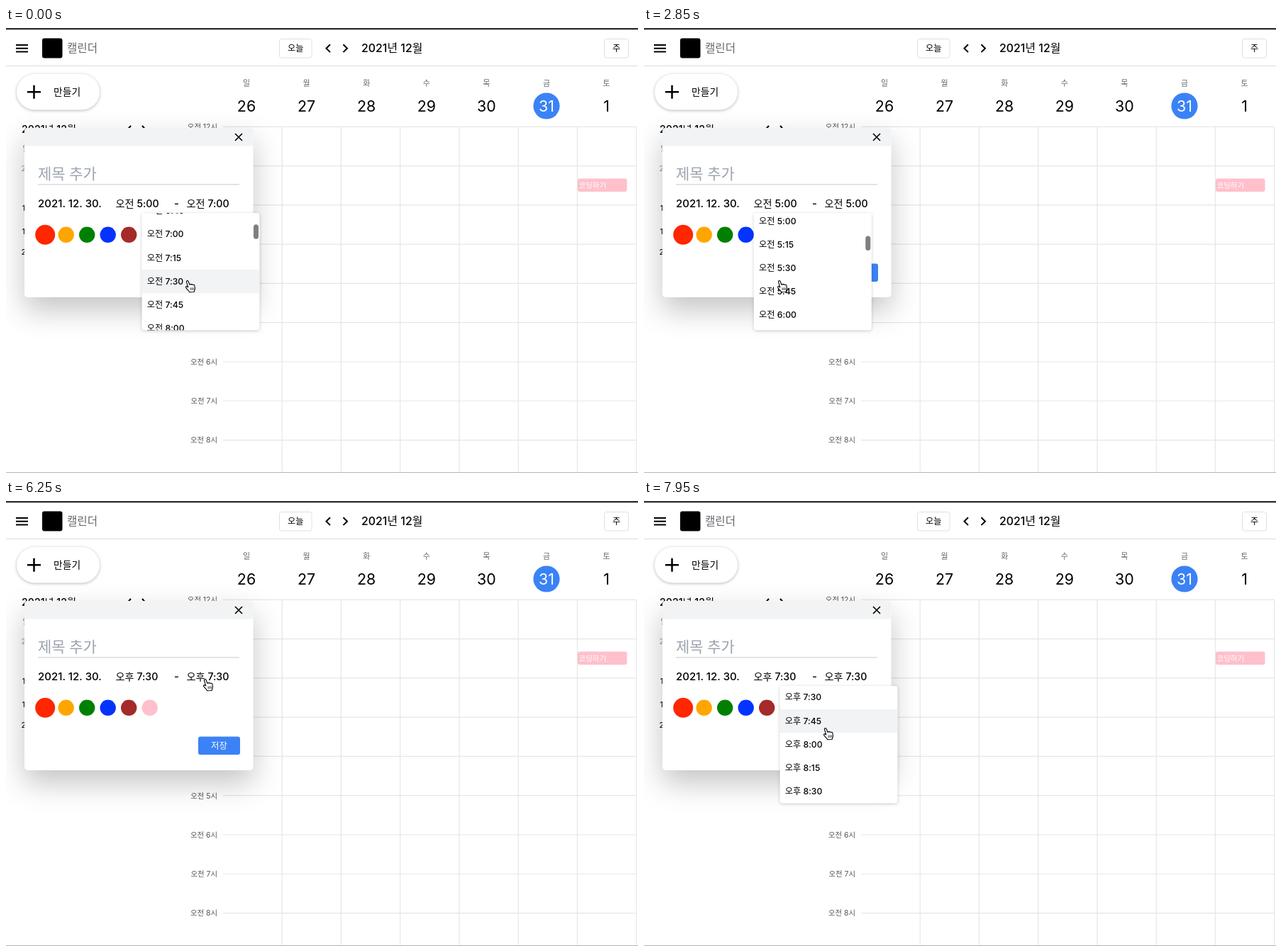
An HTML page that plays this animation: 891x628 px, repeating every 8000 ms.

```html
<!DOCTYPE html>
<html lang="ko">
<head>
<meta charset="utf-8">
<style>
  html, body { margin: 0; width: 100%; height: 100%; overflow: hidden; background: #fff; }
  svg { display: block; width: 891px; height: 628px; }
  text { font-family: Inter, "Noto Sans CJK KR", "Noto Sans CJK", sans-serif; white-space: pre; }
  .ln { fill: none; stroke: #000; stroke-width: 2; }
  .grid { stroke: #e6e6e6; stroke-width: 1.2; }
  .modal { filter: drop-shadow(0 18px 20px rgba(0,0,0,.23)); }
  .pill { filter: drop-shadow(0 1px 2px rgba(0,0,0,.28)); }
  .menu { filter: drop-shadow(0 1px 2px rgba(0,0,0,.2)); }
</style>
</head>
<body>
<svg id="stage" viewBox="0 0 891 628">
  <clipPath id="menuClip"><rect y="261" width="166" height="165.5" rx="4"/></clipPath>
  <g id="page">
    <g id="back"></g>
    <g id="dialog"></g>
    <g id="menu">
      <rect class="menu" y="261" width="166" height="165.5" rx="4" fill="#fff"/>
      <g clip-path="url(#menuClip)">
        <rect id="hover" width="166" height="33.2" fill="#f1f3f4"/>
        <g id="rows"></g>
      </g>
      <rect id="thumb" x="157.5" width="7" height="20.5" rx="3.5" fill="#7f7f7f"/>
    </g>
  </g>
  <rect width="891" height="2.4" fill="#35343b"/>
  <rect y="627" width="891" height="1" fill="#b4b4b6"/>
  <g id="cursor">
    <path id="arrow" d="M0 0V13.5L3.1 10.6 5.2 15.6 7.4 14.7 5.3 9.8H9.4Z" fill="#000" stroke="#fff" stroke-width=".9"/>
    <g id="hand" stroke="#000" stroke-linejoin="round">
      <path d="M-3.6 1.8C-3.3.2-1.2.2-.8 1.7L.8 6.3C1.1 5.2 2.9 5.2 3.2 6.3 3.7 5.3 5.3 5.5 5.6 6.7 6.2 5.9 7.7 6.3 7.9 7.5L8.4 11C8.6 13.2 7.4 14.4 7.1 16.5L.8 16.8C0 14.9-2.6 13-4.2 10.6-5 9.2-3.6 8.2-2.4 9L-1.3 9.9Z" fill="#fff" stroke-width="1.1"/>
      <path d="M2 10.5L2.4 14M4.1 10.4L4.5 13.9M6.1 10.3L6.4 13.6" fill="none" stroke-width=".8"/>
    </g>
  </g>
</svg>
<script>
const $ = id => document.getElementById(id);
const NS = 'http://www.w3.org/2000/svg';
const LOOP = 8000, STEP = 50, ROW = 33.2, TOP = 260.7;

function add(parent, tag, attrs, body) {
  const el = document.createElementNS(NS, tag);
  for (const k in attrs) el.setAttribute(k, attrs[k]);
  if (body) el.textContent = body;
  parent.appendChild(el);
  return el;
}
const label = (g, x, y, size, body, more = {}) =>
  add(g, 'text', { x, y, 'font-size': size, ...more }, body);
const box = (g, x, y, width, height, rx, fill, more = {}) =>
  add(g, 'rect', { x, y, width, height, rx, fill, ...more });
const path = (g, d, more = {}) => add(g, 'path', { d, class: 'ln', ...more });
const dot = (g, cx, cy, r, fill) => add(g, 'circle', { cx, cy, r, fill });
const MID = { 'text-anchor': 'middle' }, MED = { 'font-weight': 500 };

function drawBack(g) {
  // header
  path(g, 'M0 53.5H891', { style: 'stroke:#dcdcdc;stroke-width:1.2' });
  path(g, 'M14 24H31M14 28.7H31M14 33.4H31');
  box(g, 51, 14.5, 28.5, 28, 3, '#000');
  label(g, 86, 33.8, 15.6, '캘린더', { fill: '#63666b' });
  for (const [x, w, s] of [[385.5, 45.5, '오늘'], [843.5, 34, '주']]) {
    box(g, x, 15.5, w, 26.5, 3, '#fff', { stroke: '#e0e0e0' });
    label(g, x + w / 2, 32.6, 12.2, s, { ...MID, ...MED });
  }
  path(g, 'M457 23.3L451.5 28.7 457 34.1M475.5 23.3L481 28.7 475.5 34.1');
  label(g, 501, 34, 15.9, '2021년 12월', MED);

  // side column
  box(g, 15, 65, 117, 50.5, 25.2, '#fff', { class: 'pill' });
  path(g, 'M30 90.3H49M39.5 80.8V99.8', { style: 'stroke-width:2.5' });
  label(g, 67, 95, 13.8, '만들기', MED);
  label(g, 22, 148, 14.2, '2021년 12월', MED);
  path(g, 'M176 138L171.5 143 176 148M192 138L196.500 143 192 148');
  label(g, 28, 174, 10, '일', { ...MID, fill: '#70757a' });
  [[202, '26', '#999'], [258, '12'], [291, '19'], [320, '26']].forEach(([y, s, c]) =>
    label(g, 28, y, 10.5, s, { ...MID, fill: c || '#000' }));

  // week header
  [...'일월화수목금토'].forEach((day, i) => {
    const x = 339 + i * 84.6, today = i === 5;
    label(g, x, 82, 11, day, { ...MID, fill: '#66696e' });
    if (today) dot(g, x, 110, 18.6, '#3b82f6');
    label(g, x, 117.8, 21.4, [26, 27, 28, 29, 30, 31, 1][i],
      { ...MID, fill: today ? '#fff' : '#000' });
  });

  // hours and grid
  for (let h = 0; h < 9; h++) {
    const y = 139.3 + h * 55.28;
    path(g, `M306 ${y}H889`, { class: 'grid' });
    label(g, 298, y + 3.9, 10.4, `오전 ${h || 12}시`, { 'text-anchor': 'end', fill: '#555' });
  }
  for (let i = 0; i < 7; i++) path(g, `M${389.2 + i * 83.25} 139V627`, { class: 'grid' });
  box(g, 806, 212.5, 69.5, 18.5, 3, '#ffc0cb');
  label(g, 807.500, 226, 10.5, '코딩하기', { fill: '#fff' });
}

function drawDialog(g) {
  box(g, 26, 141, 322.5, 239, 5, '#fff', { class: 'modal' });
  path(g, 'M26 166.500V146Q26 141 31 141H343.500Q348.500 141 348.500 146V166.500Z',
    { style: 'fill:#f1f3f4;stroke:none' });
  path(g, 'M323 149L333 159M333 149L323 159', { style: 'stroke-width:1.6' });
  label(g, 45, 213, 21, '제목 추가', { fill: '#9ca3af', ...MED });
  path(g, 'M45 220.7H329', { style: 'stroke:#d9dadc;stroke-width:1.6' });
  label(g, 45, 253.3, 15, '2021. 12. 30.', MED);
  label(g, 237, 253, 15, '-', MED);
  ['#ff2600', '#ffa500', '#008000', '#0433ff', '#a52a2a', '#ffc0cb'].forEach((c, i) =>
    dot(g, 55.200 + i * 29.5, 291.8, i ? 11.2 : 14, c));
  box(g, 271, 332.5, 59, 25.5, 3, '#3b82f6');
  label(g, 300.5, 349.7, 12.4, '저장', { ...MID, ...MED, fill: '#fff' });
}

drawBack($('back'));
drawDialog($('dialog'));
const start = label($('dialog'), 154.5, 253.3, 14.2, '', MED);
const end = label($('dialog'), 254.5, 253.3, 14.2, '', MED);
const rows = Array.from({ length: 7 }, () => label($('rows'), 7.3, 0, 12.2, '', MED));

// quarter-hour index to clock text
function clock(i) {
  const h = Math.floor(i / 4), m = String(i % 4 * 15).padStart(2, '0');
  return `${h < 12 ? '오전' : '오후'} ${h % 12 || 12}:${m}`;
}

// [time, value...]
const POINTER = [
  [0, 258, 356], [450, 258, 356], [850, 247, 281], [1350, 247, 281],
  [1900, 197, 246], [2050, 197, 246], [2450, 193, 356], [4350, 193, 356],
  [4600, 193, 365], [5400, 193, 365], [5950, 283, 251], [6300, 283, 251],
  [6600, 285, 300], [6750, 285, 300], [7300, 286, 330], [7950, 258, 320]
];
const SCROLL = [
  [0, 251.6], [300, 0], [2550, 0], [3400, 1300], [3500, 1300],
  [3900, 1806], [4050, 1806], [4600, 2504], [4950, 0]
];
const SHIFT = [
  [0, 0], [6750, 0], [6800, .25], [6950, .6], [7100, .8], [7300, 1],
  [7500, .6], [7650, .4], [7800, .25], [7950, 0]
];
// open, close, left, first entry
const MENUS = [[0, 1100, 191.5, 20], [1900, 4950, 154.8, 0], [6300, 8000, 191.5, 78]];

const smooth = u => u * u * (3 - 2 * u);
const glide = u => 1 - Math.pow(1 - u, 1.66);
const linear = u => u;

function sample(track, t, ease) {
  let i = track.length - 1;
  while (i && track[i][0] > t) i--;
  const a = track[i], b = track[i + 1];
  if (!b) return a.slice(1);
  const u = ease((t - a[0]) / (b[0] - a[0]));
  return a.slice(1).map((v, k) => v + (b[k + 1] - v) * u);
}
const show = (el, on) => el.setAttribute('visibility', on ? 'visible' : 'hidden');
const inside = (v, lo, hi) => v >= lo && v < hi;

function drawMenu([, , left, first], t, s, y) {
  const top = Math.floor(s / ROW);
  $('menu').setAttribute('transform', `translate(${left} 0)`);
  rows.forEach((row, k) => {
    const i = top + k;
    row.textContent = first + i < 96 ? clock(first + i) : '';
    row.setAttribute('y', TOP + i * ROW - s + 20.7);
  });
  const idle = inside(t, 50, 500) || inside(t, 2600, 4500);
  const hit = Math.floor((y - TOP + s) / ROW);
  $('hover').setAttribute('y', TOP + hit * ROW - s);
  $('hover').setAttribute('opacity', !idle && inside(y, 261, 427) ? 1 : 0);
  const max = (96 - first) * ROW - 166;
  $('thumb').setAttribute('y', 262 + s / max * 142);
  $('thumb').setAttribute('opacity', t < 1100 || inside(t, 2600, 4950) ? 1 : 0);
}

function render(time) {
  const t = Math.floor(time % LOOP / STEP) * STEP;
  const [x, y] = sample(POINTER, t, smooth);
  const [s] = sample(SCROLL, Math.min(t, 4949), glide);
  const [dy] = sample(SHIFT, t, linear);
  const menu = MENUS.find(m => inside(t, m[0], m[1]));

  $('page').setAttribute('transform', `translate(0 ${dy})`);
  start.textContent = clock(t < 4950 ? 20 : 78);
  end.textContent = clock(t < 1100 ? 28 : t < 4950 ? 20 : 78);

  show($('menu'), menu);
  if (menu) drawMenu(menu, t, t < 4950 ? s : 0, y - dy);

  const overMenu = menu && inside(x, menu[2], menu[2] + 166) && inside(y, 261, 427);
  const overTime = inside(y, 238, 259) && (inside(x, 155, 216) || inside(x, 255, 316));
  show($('hand'), overMenu || overTime);
  show($('arrow'), !(overMenu || overTime));
  $('cursor').setAttribute('transform', `translate(${x} ${y})`);
}

const born = performance.now();
function tick() {
  render(performance.now() - born);
  requestAnimationFrame(tick);
}
render(0);
tick();
</script>
</body>
</html>
```
